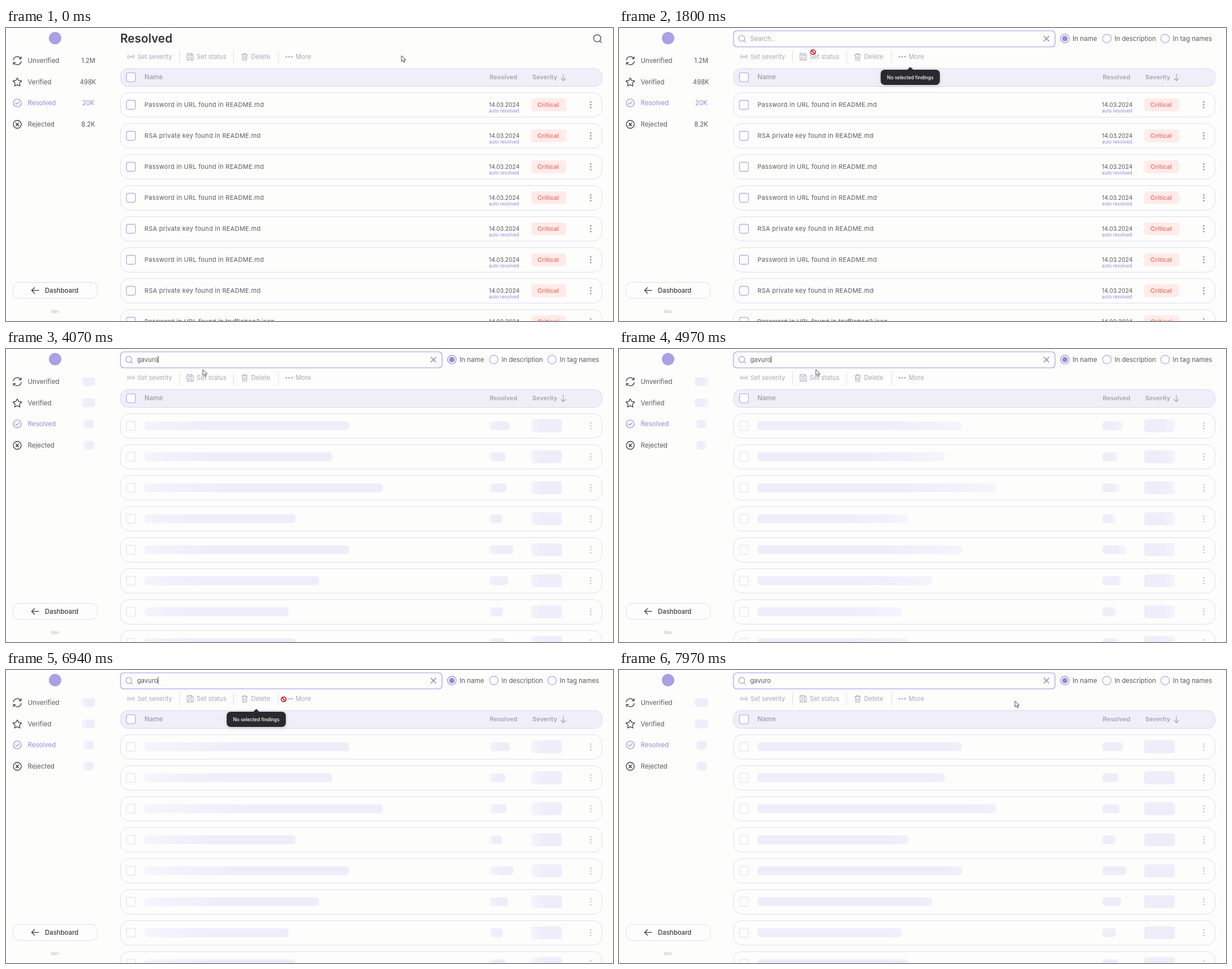
Recreate the animation shown at these times as an HTML page. Size 1076 px wide and 520 px high, loop 8 s.

```html
<!DOCTYPE html>
<html lang="en">
<head>
<meta charset="utf-8">
<title>Resolved findings</title>
<style>
html, body { margin: 0; width: 100%; height: 100%; overflow: hidden; background: #fdfdfc; }
svg { display: block; width: 1076px; height: 520px; }
text { font-family: Inter, "Open Sans", sans-serif; font-size: 11.2px; fill: #5a5a60; white-space: pre; }
.line { fill: none; stroke-linecap: round; stroke-linejoin: round; }
</style>
</head>
<body>
<svg id="stage" viewBox="0 0 1076 520" xmlns="http://www.w3.org/2000/svg"></svg>
<script>
const LOOP = 8000;
const PURPLE = "#9389da", SOFT = "#aea5e4", PALE = "#dfdbf2", DARK = "#3c3c42", MUTED = "#a8a8bb";
const TEXT = "#5a5a60", PAPER = "#fdfdfc";
const QUERY = "gavuro";
const FIRST_KEY = 3240, KEY_GAP = 100, LOAD_AT = 3300, OPEN_AT = 1000, BLINK = 530;
const WAVE = 1400, WAVE_SHIFT = 360;

const attrs = o => Object.entries(o).map(([k, v]) => `${k}="${v}"`).join(" ");
const text = (x, y, s, o = {}) => `<text x="${x}" y="${y}" ${attrs(o)}>${s}</text>`;
const rect = (x, y, width, height, rx, o = {}) => `<rect ${attrs({ x, y, width, height, rx, ...o })}/>`;
const circle = (cx, cy, r, o = {}) => `<circle ${attrs({ cx, cy, r, ...o })}/>`;
const line = (d, stroke, width = 1.2) => `<path class="line" d="${d}" stroke="${stroke}" stroke-width="${width}"/>`;
const ring = (cx, cy, r, stroke, width = 1.2) => circle(cx, cy, r, { fill: "none", stroke, "stroke-width": width });
const group = (id, body, o = {}) => `<g id="${id}" ${attrs(o)}>${body}</g>`;
const checkbox = (y, stroke = SOFT) => rect(213.5, y - 8, 16, 16, 3.5, { fill: PAPER, stroke, "stroke-width": 1.2 });
const magnifier = (x, y, r, color) => ring(x, y, r, color, 1.2) + line(`M${x + r * .72} ${y + r * .72}l3 3`, color);
const dots = (y, fill) => [-5, 0, 5].map(d => circle(1036.5, y + d, 1.4, { fill })).join("");

function star(cx, cy) {
  const pts = Array.from({ length: 10 }, (_, i) => {
    const a = Math.PI * (i / 5 - .5), r = i % 2 ? 4.2 : 8;
    return `${(cx + r * Math.cos(a)).toFixed(1)} ${(cy + r * Math.sin(a)).toFixed(1)}`;
  });
  return line(`M${pts.join("L")}Z`, DARK, 1.3);
}

function sidebar() {
  const icons =
    line("M13 56.5A7.2 7.2 0 0 1 26 54M26.8 51v3.6h-3.6M27 59.5A7.2 7.2 0 0 1 14 62M13.2 65v-3.6h3.6", DARK, 1.3) +
    star(20, 96.5) +
    ring(20, 133, 7, PURPLE) + line("M17 133l2.2 2.2 4-4.2", PURPLE) +
    ring(20, 171, 7, DARK, 1.3) + line("M17.6 168.6l4.8 4.8m0-4.8l-4.8 4.8", DARK, 1.4);
  const names = ["Unverified", "Verified", "Resolved", "Rejected"];
  const labels = names.map((s, i) =>
    text(38.5, 62 + 37.6 * i, s, { style: `font-size:11.5px;fill:${i === 2 ? PURPLE : TEXT}` })).join("");
  return circle(87, 18, 11, { fill: "#ab9fe6" }) + icons + labels +
    rect(12.5, 451.5, 149.5, 28.5, 10, { fill: PAPER, stroke: PALE }) +
    line("M58 465.7H45.5m5-5l-5 5 5 5", DARK, 1.3) +
    text(69, 469.5, "Dashboard", { style: `font-size:11.4px;font-weight:500;fill:${DARK}` }) +
    text(79.5, 505.5, "dev", { style: "font-size:8.5px;fill:#b8b8c4" });
}

function toolbar() {
  const label = (x, s, size = 11.2) => text(x, 55, s, { style: `font-size:${size}px;fill:${MUTED}` });
  const waves = circle(221.5, 51, 1.3, { fill: MUTED }) +
    line("M219 48.7q-1.6 2.3 0 4.6M224 48.7q1.6 2.3 0 4.6M216.6 47.5q-2.4 3.5 0 7M226.4 47.5q2.4 3.5 0 7", MUTED, 1);
  const disk = line("M322 45.5h7l3 3v8.5h-11v-10.5zM324 45.5v4h4.5v-4M324 57v-4.5h5V57", MUTED, 1.1);
  const bin = line("M417.8 47.5h10.4M421 47.3v-2h4v2M419 48l.6 9h6.8l.6-9M421.8 50.5v4M424.2 50.5v4", MUTED, 1.1);
  const more = [497, 502, 507].map(x => circle(x, 51, 1.5, { fill: MUTED })).join("");
  const bars = [307.5, 403.5, 483].map(x => line(`M${x} 40v22`, "#dfdfe5", 1)).join("");
  return waves + disk + bin + more + bars +
    label(233, "Set severity", 11) + label(338, "Set status") + label(434.5, "Delete") + label(513.5, "More");
}

function tableHead() {
  const label = (x, s, size) => text(x, 91, s, { style: `font-size:${size}px;font-weight:600;fill:#a5a4b2` });
  return rect(203, 72, 853.5, 31.5, 13, { fill: "#f0eff9", stroke: "#d9d5f0" }) + checkbox(87.5) +
    label(245.5, "Name", 11.5) + label(857.5, "Resolved", 11) + label(933, "Severity", 11) +
    line("M988 82v11.5m-4-4l4 4 4-4", "#a5a4b2", 1.2);
}

const rowY = i => 136.3 + 55 * i;
const rowBoxes = () => Array.from({ length: 8 }, (_, i) =>
  rect(203, rowY(i) - 21.5, 853.5, 43.5, 15, { fill: PAPER, stroke: PALE })).join("");

function findings() {
  const password = "Password in URL found in README.md", rsa = "RSA private key found in README.md";
  const names = [password, rsa, password, password, rsa, password, rsa, "Password in URL found in trufflehog3.json"];
  const counts = [[133.5, "1.2M"], [131, "498K"], [135, "20K"], [133.5, "8.2K"]];
  return names.map((s, i) => {
    const y = rowY(i);
    return checkbox(y) + text(245.5, y + 3.7, s, { style: "font-size:11px;letter-spacing:.3px" }) +
      text(856, y + 3.7, "14.03.2024", { style: "font-size:10.3px" }) +
      text(856, y + 14, "auto resolved", { style: `font-size:8.4px;fill:${PURPLE}` }) +
      rect(931, y - 11.5, 62, 23, 5, { fill: "#ffebe9" }) +
      text(942, y + 3.7, "Critical", { style: "font-size:11px;font-weight:600;fill:#f0766f" }) +
      dots(y, "#94949d");
  }).join("") + counts.map(([x, s], i) =>
    text(x, 62 + 37.6 * i, s, { style: `font-size:11.2px;fill:${i === 2 ? PURPLE : TEXT}` })).join("");
}

function skeleton() {
  const nameEnds = [608, 578, 668, 513, 608, 555, 501, 513];
  const dateEnds = [893, 885, 887, 880, 899, 890, 881, 885];
  const bar = (x, y, end, h) => rect(x, y - h / 2, end - x, h, 5, { fill: "url(#wave)" });
  const fixed = nameEnds.map((_, i) => checkbox(rowY(i), "#e5e2f5") + dots(rowY(i), "#c6c6cf")).join("");
  const bars = nameEnds.map((end, i) =>
    bar(245.5, rowY(i), end, 15.5) + bar(857, rowY(i), dateEnds[i], 15.5) + bar(931, rowY(i), 985.5, 23)).join("");
  const counts = [0, 1, 2, 3].map(i => bar(i < 2 ? 134.5 : 137.5, 58 + 37.6 * i, i < 2 ? 158 : 155.5, 15.5)).join("");
  return fixed + bars + counts;
}

function searchBar() {
  const radio = (x, label, size, on) => ring(x, 18.8, 7.6, on ? PURPLE : SOFT, 1.2) +
    (on ? circle(x, 18.8, 4.8, { fill: PURPLE }) : "") + text(x + 13.6, 22.5, label, { style: `font-size:${size}px` });
  return rect(203, 5, 570, 28.5, 6, { fill: PAPER, stroke: "#a098de", "stroke-width": 1.1 }) +
    magnifier(217.6, 18.5, 5.3, "#a8a4c6") +
    line("M753.3 14.5l8.8 8.8m0-8.8l-8.8 8.8", "#85859a", 1.3) +
    radio(790.3, "In name", 11.6, true) + radio(864.8, "In description", 11.4) + radio(968, "In tag names", 11.5) +
    text(232.5, 22.8, "", { id: "query" }) +
    `<path id="caret" d="M0 12.5v12.5" stroke="${DARK}"/>`;
}

const tooltip = rect(-52.5, 74, 105, 27, 7, { fill: "#2c2c2e" }) +
  `<path d="M-5.5 74.5L0 69l5.5 5.5z" fill="#2c2c2e"/>` +
  text(0, 91, "No selected findings", { "text-anchor": "middle", style: "font-size:8.4px;font-weight:500;fill:#fff" });

const arrow = `<path d="M0 0v10.6l2.5-2.3 1.8 3.9 1.7-.8-1.8-3.8h3.4z" fill="#fff" stroke="#333" stroke-width=".9"/>`;
const blocked = circle(0, 0, 4.2, { fill: "#fff", stroke: "#c8242b", "stroke-width": 1.8 }) +
  line("M-2.8 -2.8L2.8 2.8", "#c8242b", 1.8);

const stage = document.getElementById("stage");
stage.innerHTML = `<defs>
  <filter id="shade" x="-20%" y="-30%" width="140%" height="180%">
    <feDropShadow dx="0" dy="2" stdDeviation="3" flood-color="#555" flood-opacity=".22"/></filter>
  <linearGradient id="wave">
    <stop offset="0" stop-color="#efedfa"/><stop offset=".5" stop-color="#f7f6fc"/><stop offset="1" stop-color="#efedfa"/>
  </linearGradient></defs>` +
  rect(0, 0, 1076, 520, 0, { fill: PAPER }) + sidebar() +
  group("title", text(202.5, 26.3, "Resolved", { style: "font-size:20.8px;font-weight:600;fill:#333338" }) +
    magnifier(1048, 18.3, 6.4, DARK)) +
  group("search", searchBar()) + toolbar() + tableHead() + rowBoxes() +
  group("findings", findings()) + group("loading", skeleton()) +
  group("tip", tooltip, { filter: "url(#shade)" }) +
  group("arrow", arrow) + group("blocked", blocked);

const el = Object.fromEntries([...stage.querySelectorAll("[id]")].map(e => [e.id, e]));
const show = (e, on) => e.setAttribute("display", on ? "inline" : "none");
const move = (e, x, y) => e.setAttribute("transform", `translate(${x.toFixed(2)} ${y.toFixed(2)})`);

const ease = { in: u => u * u, out: u => u * (2 - u), both: u => u * u * (3 - 2 * u) };
const path = [
  [0, 701, 49], [100, 701, 49], [700, 1046, 19, "both"], [1300, 1046, 19],
  [1600, 525, 50, "in"], [1800, 344, 43, "out"], [2000, 349, 36.5, "both"],
  [6600, 349, 36.5], [6940, 491, 52, "in"], [7300, 702, 55, "out"], [LOOP, 702, 55]
];

function pointer(t) {
  const i = Math.max(1, path.findIndex(p => p[0] >= t));
  const [t0, x0, y0] = path[i - 1], [t1, x1, y1, kind] = path[i];
  const u = kind ? ease[kind]((t - t0) / (t1 - t0)) : (t - t0) / (t1 - t0);
  return [x0 + (x1 - x0) * u, y0 + (y1 - y0) * u];
}

// x centre, start and end of each hover tip
const tips = [[516.3, 1640, 1920], [443.6, 6850, 7040]];
const FADE = 80;

let shown = null;

function draw(t) {
  const open = t >= OPEN_AT, loading = t >= LOAD_AT;
  show(el.title, !open);
  show(el.search, open);
  show(el.findings, !loading);
  show(el.loading, loading);

  // a light band sweeps across every placeholder
  const centre = -.5 + 2 * ((t + WAVE_SHIFT) / WAVE % 1);
  el.wave.setAttribute("x1", centre - .5);
  el.wave.setAttribute("x2", centre + .5);

  const typed = Math.max(0, Math.min(QUERY.length, Math.floor((t - FIRST_KEY) / KEY_GAP) + 1));
  if (typed !== shown) {
    el.query.textContent = typed ? QUERY.slice(0, typed) : "Search..";
    el.query.style.fill = typed ? TEXT : "#a2a2ad";
    shown = typed;
  }
  const lastKey = typed ? FIRST_KEY + (typed - 1) * KEY_GAP : OPEN_AT + 200;
  show(el.caret, open && Math.floor((t - lastKey) / BLINK) % 2 === 0);
  move(el.caret, 233 + (typed && open ? el.query.getComputedTextLength() : 0), 0);

  const tip = tips.find(([, a, b]) => t >= a && t <= b);
  show(el.tip, !!tip);
  if (tip) {
    const [x, a, b] = tip;
    move(el.tip, x, 0);
    el.tip.setAttribute("opacity", Math.min(1, (t - a) / FADE, (b - t) / FADE));
  }

  const [x, y] = pointer(t);
  const barred = x > 207 && x < 550 && y > 40 && y < 62;
  show(el.arrow, !barred);
  show(el.blocked, barred);
  move(el.arrow, x, y);
  move(el.blocked, x, y);
}

const start = performance.now();
function tick() {
  draw((performance.now() - start) % LOOP);
  requestAnimationFrame(tick);
}
tick();
</script>
</body>
</html>
```
